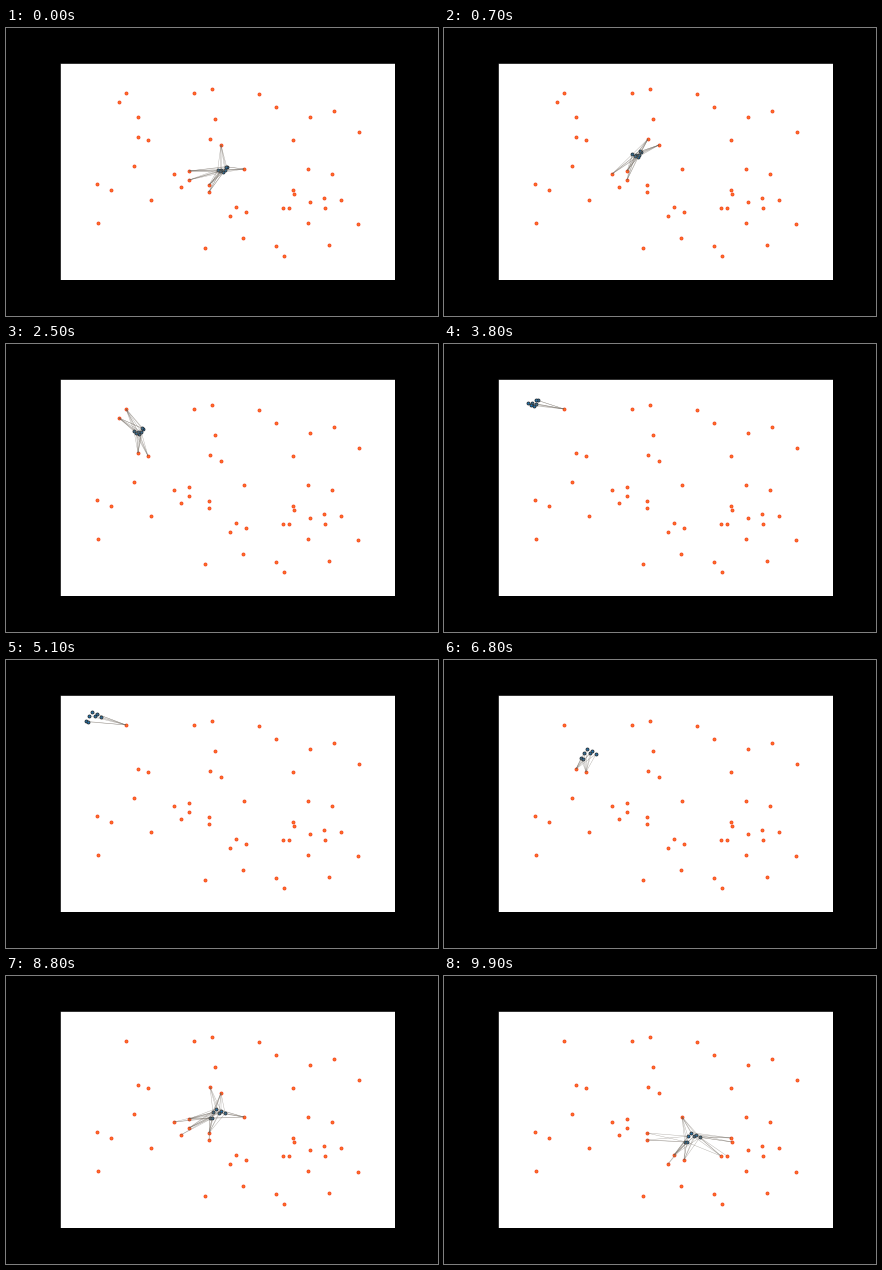
These frames come from a looping animation (432 px wide and 288 px high, 10000 ms). A matplotlib script:

```python
import numpy as np
import matplotlib.pyplot as plt
from matplotlib.animation import FuncAnimation
from matplotlib.collections import LineCollection

W, H = 432, 288
FRAMES, STEP_MS = 100, 100
LEFT, RIGHT, BOTTOM, TOP = 0.125, 0.9, 0.125, 0.88

REACH = 12.5                     # link distance in field units
WALL = (4.0, 94.6)               # corner where the swarm turns round
HOME = np.array([48.6, 50.8])    # swarm centre at the start
RETURN = np.array([-41.2, 140.7])  # virtual start of the way back
HEADING = np.array([-1, 1])

# Agents around the centre on the way back; mirrored and tighter going out.
FORMATION = np.array([(-0.2, 2.2), (-1.1, 0.5), (0.7, 0.4), (1.3, 1.3),
                      (2.5, 0), (-2, -2), (-1.4, -2.25)])
TIGHT = -0.6


def field(points):
    """Convert stage pixels to the 0..100 field."""
    x, y = np.array(points, float).T
    return 100 * np.column_stack([(x / W - LEFT) / (RIGHT - LEFT),
                                  (1 - y / H - BOTTOM) / (TOP - BOTTOM)])


def route_distance(p):
    """Distance from p to the diagonal the swarm flies along."""
    corner, end = HOME + 45 * HEADING, RETURN - FRAMES * HEADING
    way = end - corner
    t = np.clip((p - corner) @ way / (way @ way), 0, 1)
    return np.hypot(*(p - corner - t * way))


def scatter_food(near, count, seed):
    """Add random food out of the swarm's reach."""
    rng = np.random.default_rng(seed)
    spots = list(near)
    while len(spots) < len(near) + count:
        p = rng.uniform(11, 90, 2)
        gap = min(np.hypot(*(p - s)) for s in spots)
        if gap > 4 and route_distance(p) > REACH + 2:
            spots.append(p)
    return np.array(spots)


def swarm(step):
    """Fly to the upper left corner, turn at the walls, fly back."""
    out = HOME + TIGHT * FORMATION + HEADING * step
    back = RETURN + FORMATION - HEADING * step
    x = np.maximum(np.maximum(out[:, 0], back[:, 0]), WALL[0])
    y = np.minimum(np.minimum(out[:, 1], back[:, 1]), WALL[1])
    return np.column_stack([x, y])


def remaining(step):
    """Food on the outbound path is eaten just after the swarm passes."""
    x = food[:, 0]
    on_path = (abs(food.sum(axis=1) - HOME.sum()) < 2) & (x < HOME[0])
    return food[~(on_path & (HOME[0] - step < x - 3))]


near_food = field([
    (120, 65), (113, 74), (132, 89), (132, 109), (142, 112), (204, 111),
    (215, 117), (168, 146), (183, 143), (183, 152), (238, 141), (203, 157),
    (203, 164), (230, 179), (240, 184), (224, 188), (277, 180), (283, 180),
    (287, 162), (288, 166),
])
food = scatter_food(near_food, count=28, seed=5)

fig = plt.figure(figsize=(W / 72, H / 72), dpi=72, facecolor="black")
ax = fig.add_axes([LEFT, BOTTOM, RIGHT - LEFT, TOP - BOTTOM])
ax.set(xlim=(0, 100), ylim=(0, 100), xticks=[], yticks=[])

dot = dict(s=9, linewidths=0.8)
food_dots = ax.scatter(*food.T, c="#ff7420", edgecolors="#f5401c",
                       zorder=2, **dot)
agent_dots = ax.scatter(*swarm(0).T, c="#1f77b4", edgecolors="#20262c",
                        zorder=3, **dot)
links = LineCollection([], colors="#6a6258", linewidths=0.4, alpha=0.55,
                       zorder=4)
ax.add_collection(links)


def draw(step):
    agents, left = swarm(step), remaining(step)
    food_dots.set_offsets(left)
    agent_dots.set_offsets(agents)
    links.set_segments([(a, f) for a in agents for f in left
                        if np.hypot(*(a - f)) < REACH])
    return food_dots, agent_dots, links


anim = FuncAnimation(fig, draw, frames=FRAMES, interval=STEP_MS,
                     init_func=lambda: draw(0), repeat=True, repeat_delay=0)
plt.show()
```
